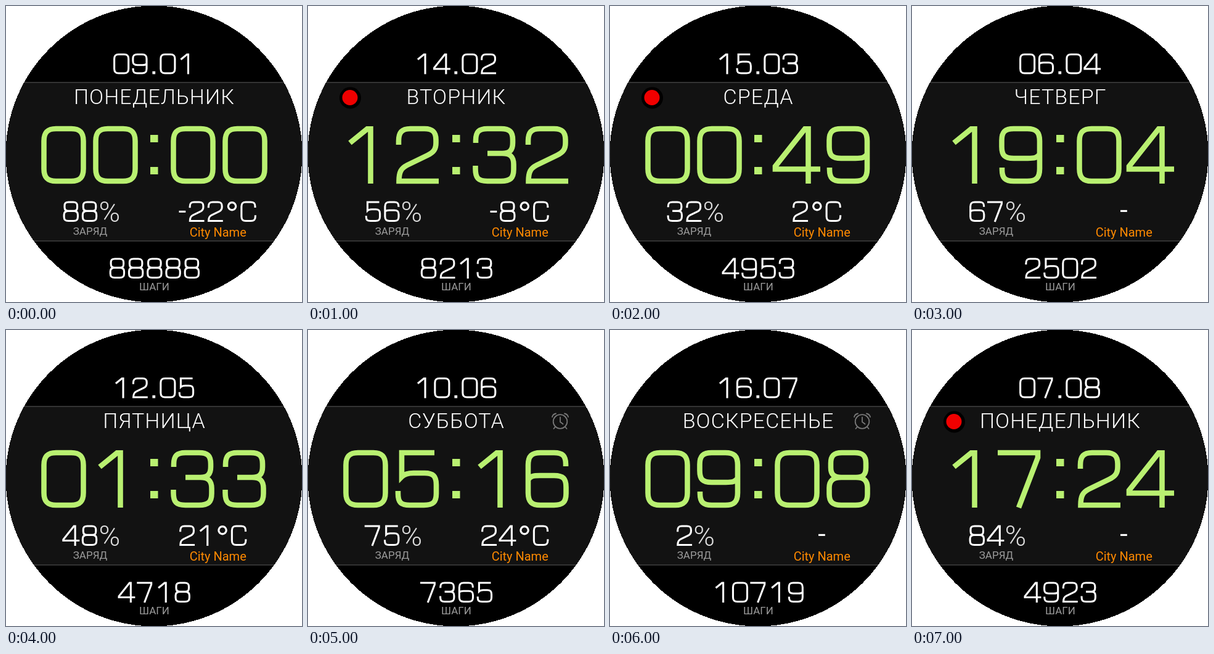
These frames come from a looping animation (480 px wide and 480 px high, 8000 ms). An HTML page:

```html
<!DOCTYPE html>
<html lang="ru">
<head>
<meta charset="utf-8">
<style>
html, body { margin: 0; width: 100%; height: 100%; overflow: hidden; background: #fff; }
svg { display: block; width: 100vw; height: 100vh; }
text { font-family: Roboto, sans-serif; text-anchor: middle; }
.digits { fill: none; stroke: #fff; stroke-width: 8.6; stroke-miterlimit: 3; }
.label { font-size: 17px; fill: #9b9b9b; }
</style>
</head>
<body>
<svg viewBox="0 0 480 480">
  <circle cx="240" cy="240" r="240.5" shape-rendering="crispEdges"/>
  <clipPath id="dial"><circle cx="240" cy="240" r="240"/></clipPath>
  <g clip-path="url(#dial)">
    <rect y="123" width="480" height="259" fill="#333"/>
    <rect y="125" width="480" height="255" fill="#121212"/>
  </g>
  <g id="link">
    <circle cx="68.5" cy="149" r="17.5"/>
    <circle cx="68" cy="148.5" r="12.5" fill="#f00000"/>
  </g>
  <g id="alarm" fill="none" stroke="#777" stroke-width="1.8" stroke-linecap="round">
    <circle cx="409" cy="148.5" r="11.3"/>
    <path d="M409 141.5V149L413.5 152.5M396 141Q397 136.500 402 135.500M422 141Q421 136.500 416 135.500M401 157L398.500 160M417 157L419.500 160"/>
  </g>
  <g id="date" class="digits"></g>
  <text id="day" x="240.5" y="159" font-size="34" font-weight="300" letter-spacing="1.1" fill="#fff"></text>
  <g id="clock" class="digits" style="stroke:#b9f071"></g>
  <path d="M234 209h12.500v12h-12.500zM234 261h12.500v12h-12.500z" fill="#b9f071"/>
  <g id="charge" class="digits"></g>
  <text id="percent" y="350" font-size="47" font-weight="300" fill="#ddd" style="text-anchor:start">%</text>
  <text class="label" x="136.500" y="370.500">ЗАРЯД</text>
  <g id="temp" class="digits"></g>
  <text x="343.700" y="374" font-size="20" fill="#ff8a00">City Name</text>
  <g id="steps" class="digits"></g>
  <text class="label" x="240.500" y="461">ШАГИ</text>
</svg>
<script>
const NINE = 'M66 45C63 51 57 52 47 52H24C9 52 4.5 47 4.5 33V23C4.5 9 10 4 24 4H46C60 4 66 9 66 24V69C66 84 60 89 46 89H24C10 89 5 84 5 70V67';

// Square-shouldered numerals, drawn as strokes in a 73 x 93 cell
const GLYPHS = {
  0: 'M24 4H49C63 4 68.5 10 68.5 24V69C68.5 83 63 89 49 89H24C10 89 4.5 83 4.5 69V24C4.5 10 10 4 24 4Z',
  1: 'M11 27L39 4.3H44.5V93',
  2: 'M6 30V24C6 10 11 4 25 4H48C61 4 66.5 9 66.5 22V27C66.5 37 63 42 53 47L20 63C10 68 6.5 74 6.5 89H71',
  3: 'M5 27V23C5 9 10 4 24 4H46C60 4 65 9 65 22V27C65 39 60 44 48 44H24M48 44C62 44 66.5 50 66.5 62V70C66.5 84 61 89 46 89H24C9 89 4.5 84 4.5 69V64',
  4: 'M74 69.500H1V65L49 4.300H54.500V93',
  5: 'M64 4H11V43C16 38 22 37 30 37H48C62 37 67 42 67 56V70C67 84 62 89 47 89H24C10 89 5 85 5 70V66',
  6: NINE,
  7: 'M-2 4H63V12L32 93',
  8: 'M24 44C11 44 7 38 7 28V21C7 9 12 4 25 4H46C59 4 64 9 64 21V28C64 38 61 44 48 44ZM24 44H48C62 44 66.500 50 66.500 61V71C66.500 84 61 89 47 89H24C10 89 4.500 84 4.500 71V61C4.500 50 10 44 24 44Z',
  9: NINE,
  '.': 'M12.500 84.500h4.500v4.200h-4.500z',
  '-': 'M0 47H30',
  '°': 'M28 6a17 17 0 1 1 -.1 0z',
  C: 'M66 29V23C66 10 61 4 46 4H24C10 4 4.500 10 4.500 24V69C4.500 83 10 89 24 89H47C62 89 67 83 67 69V63'
};
const ADVANCE = { '.': 41, '-': 43, '°': 66 };
const SMALL = 0.36;
const PITCH = 84 * SMALL;

// date, weekday, time, charge, temperature, steps, link, alarm
const STATES = [
  ['09.01', 'ПОНЕДЕЛЬНИК', '0000', '88', '-22°C', '88888', 0, 0],
  ['14.02', 'ВТОРНИК', '1232', '56', '-8°C', '8213', 1, 0],
  ['15.03', 'СРЕДА', '0049', '32', '2°C', '4953', 1, 0],
  ['06.04', 'ЧЕТВЕРГ', '1904', '67', '-', '2502', 0, 0],
  ['12.05', 'ПЯТНИЦА', '0133', '48', '21°C', '4718', 0, 0],
  ['10.06', 'СУББОТА', '0516', '75', '24°C', '7365', 0, 1],
  ['16.07', 'ВОСКРЕСЕНЬЕ', '0908', '2', '-', '10719', 0, 1],
  ['07.08', 'ПОНЕДЕЛЬНИК', '1724', '84', '-', '4923', 1, 0]
];

const el = id => document.getElementById(id);

function glyphs(str) {
  let x = 0;
  return [...str].map(ch => {
    const turn = ch === '6' ? ' rotate(180 36 46.500)' : '';
    const path = `<path transform="translate(${x})${turn}" d="${GLYPHS[ch]}"/>`;
    x += ADVANCE[ch] || 84;
    return path;
  }).join('');
}

function put(id, str, x, y) {
  el(id).innerHTML = `<g transform="translate(${x} ${y}) scale(${SMALL})">${glyphs(str)}</g>`;
}

function show(state) {
  const [date, day, time, charge, temp, steps, link, alarm] = state;
  put('date', date, 174, 77);
  el('day').textContent = day;
  el('clock').innerHTML =
    `<g transform="translate(57 195)">${glyphs(time.slice(0, 2))}</g>` +
    `<g transform="translate(267 195)">${glyphs(time.slice(2))}</g>`;

  const left = charge.length > 1 ? 92.5 : 107.5;
  put('charge', charge, left, 316.5);
  el('percent').setAttribute('x', left + PITCH * charge.length - 2.5);

  const count = temp.replace(/\D/g, '').length;
  put('temp', temp, count ? 310.5 - 15 * count : 338, count ? 316.5 : 315.5);
  put('steps', steps, 243.2 - PITCH / 2 * steps.length, 408.5);
  el('link').style.display = link ? '' : 'none';
  el('alarm').style.display = alarm ? '' : 'none';
}

let current = -1;
function update(now) {
  const index = Math.floor(now % 8000 / 1000);
  if (index !== current) show(STATES[current = index]);
}

const start = performance.now();
function tick() {
  update(performance.now() - start);
  requestAnimationFrame(tick);
}
tick();
</script>
</body>
</html>
```
